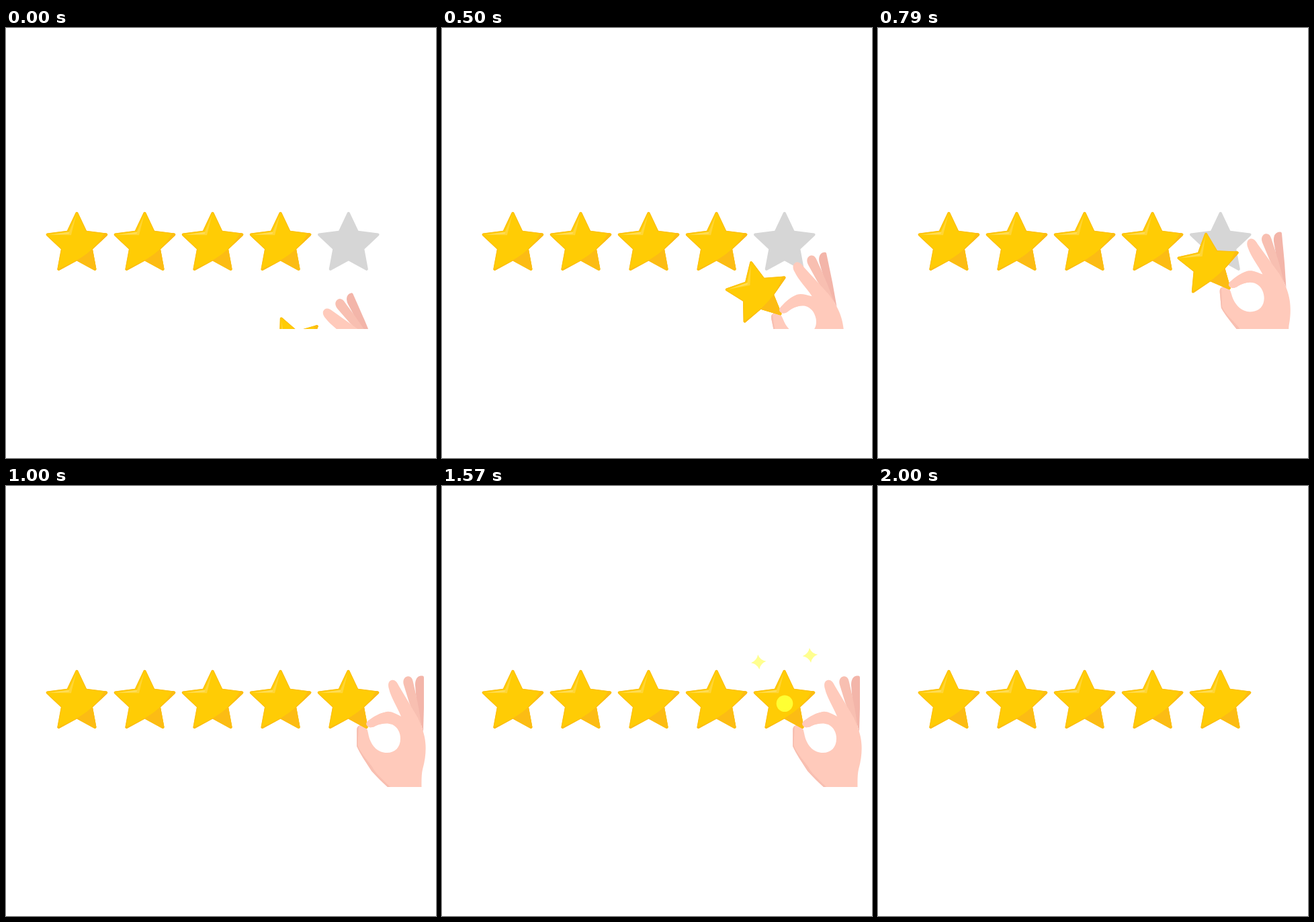
Recreate the animation shown at these times as an HTML page with a canvas. Size 640 by 640 pixels, loop 2210 ms.

```html
<!DOCTYPE html>
<html lang="en">
<head>
<meta charset="utf-8">
<title>Five star rating</title>
<style>
html, body { margin: 0; width: 100%; height: 100%; overflow: hidden; background: #fff; }
canvas { display: block; }
</style>
</head>
<body>
<canvas id="stage" width="640" height="640"></canvas>
<script>
const ctx = document.getElementById('stage').getContext('2d');
const LOOP = 2210, FPS = 14;
const FLOOR = 448;                 // the hand is hidden below this line
const SLOT = { x: 509.5, y: 307 }; // pivot of the last star
const ARRIVE = 14, LEAVE = 22, GONE = 28;
const SKIN = '#ffcabb', SKIN_MID = '#f8bfb1', SKIN_DARK = '#f3b5a9';
const GLOW = '#ffff33';

// Pose of hand and star on the way in: step, x shift, y shift, degrees
const POSES = [
  [0, -87.1, 154.3, -23.8],
  [4, -60, 104.4, -17],
  [7, -43, 73, -11.7],
  [11, -18.5, 31, -5.3],
  [14, 0, 0, 0]
];

function starPath() {
  const R = 50.7, r = 24.8, pts = [];
  for (let i = 0; i < 10; i++) {
    const a = i * Math.PI / 5 - Math.PI / 2, d = i % 2 ? r : R;
    pts.push([d * Math.cos(a), d * Math.sin(a)]);
  }
  const p = new Path2D();
  p.moveTo(...pts[9]);
  for (let i = 0; i < 10; i += 2) {
    p.arcTo(...pts[i], ...pts[i + 1], 2);
    p.lineTo(...pts[i + 1]);
  }
  p.closePath();
  return p;
}

const STAR = starPath();
const SHADE = new Path2D('M41 -17 Q24 18 -30 37.5 L-30 60 L60 60 L60 -17Z');
const FACET = new Path2D('M-1 -43 L-11.5 -18.5 L-42 -14 L-8.5 -13.5Z');
const SHINE = new Path2D('M-1.5 -41 L-11 -17.6 L-39 -14 L-12 -15.5Z');

const PALM = new Path2D(`M537 361 C536 355 529 354 525 357 C522 359 522 362 522 366
  L522 387 C527 399 536 411 544 424 C552 433 560 441 568 448 L576 520 L617 520 L618.5 448
  C618.3 437 618.6 428 620 422 C624 408 625 396 624.5 386 C624 374 621 363 613 345
  L585 298 C582 291 578 288 574.5 288.8 C569 290 568 296 570 302 C573 315 583 330 588 343
  C580 339 573 335 567 336 C556 338 548 343 541 348 C536 351 535 354 537.5 357
  C541 360.5 546 359.5 550 357 C558 353.5 567 352 575 355 C583 359 587 367 587 376
  C587 389 579 397 567 397 C553 397 545 387 541 376 C539 370 539 365 537 361Z`);
const INDEX = new Path2D(`M567 336 C556 338 548 343 541 348 C536 351 535 354 537.5 357
  C541 360.5 546 359.5 550 357 C556 354 562 353 567 353Z`);
const EDGE = new Path2D(`M525 357 C522 359 522 362 522 366 L522 387 C527 399 536 411 544 424
  C552 433 560 441 568 448 L572 448 C560 436 550 428 545 418 C536 406 527 396 523.5 386Z`);
const RING = new Path2D(`M592 296 C590 289 593 284 598 283.3 C603 283 605 287 606 292
  C610 310 615 330 619 362 L610 348 L600 322Z`);
const PINKY = new Path2D(`M609 296 C609 288 612 283.5 617 282.6 L620 282.6
  Q622 282.8 622 285 L622 330 L621 366 L612 335Z`);
const SPARK = new Path2D(`M0 -11 Q2.4 -2.4 11.3 0 Q2.4 2.4 0 11 Q-2.4 2.4 -11.3 0
  Q-2.4 -2.4 0 -11Z`);

function fill(path, color) {
  ctx.fillStyle = color;
  ctx.fill(path);
}

function drawStar(x, gold) {
  ctx.save();
  ctx.translate(x, SLOT.y + 14.7);
  if (gold) {
    ctx.clip(STAR);
    fill(STAR, '#ffcc05');
    fill(SHADE, '#fcbc14');
    ctx.lineWidth = 2.4;
    ctx.strokeStyle = '#fcbf12';
    ctx.stroke(STAR);
    fill(FACET, '#ffd535');
    fill(SHINE, '#ffdf60');
  } else {
    fill(STAR, '#d6d6d6');
  }
  ctx.restore();
}

// Smooth curve through the poses, straight on before the first one
function poseAt(s) {
  if (s < 0) return [-87.1 + 7 * s, 154.3 - 15 * s, -23.8 + 1.7 * s];
  const out = [0, 0, 0];
  for (const p of POSES) {
    let w = 1;
    for (const q of POSES) if (q !== p) w *= (s - q[0]) / (p[0] - q[0]);
    for (let i = 0; i < 3; i++) out[i] += w * p[i + 1];
  }
  return out;
}

function posed(s, draw) {
  const [dx, dy, deg] = poseAt(s);
  ctx.save();
  ctx.beginPath();
  ctx.rect(0, 0, 640, FLOOR);
  ctx.clip();
  ctx.translate(SLOT.x + dx, SLOT.y + dy);
  ctx.rotate(deg * Math.PI / 180);
  ctx.translate(-SLOT.x, -SLOT.y);
  draw();
  ctx.restore();
}

function drawHand() {
  fill(PINKY, SKIN_DARK);
  fill(RING, SKIN_MID);
  fill(PALM, SKIN);
  fill(EDGE, SKIN_MID);
}

function drawSpark(x, y, alpha) {
  ctx.save();
  ctx.globalAlpha = alpha;
  ctx.translate(x, y);
  ctx.rotate(-0.1);
  fill(SPARK, GLOW);
  ctx.restore();
}

function drawGlow(p) {
  if (p <= 0) return;
  ctx.fillStyle = GLOW;
  ctx.beginPath();
  ctx.arc(510, 323.8, 22.4 * p, 0, 2 * Math.PI);
  ctx.fill();
  drawSpark(471.3, 262, p);
  drawSpark(548, 252, p);
}

function render(t) {
  const k = Math.floor((t + 5) * FPS / 1000);
  ctx.fillStyle = '#fff';
  ctx.fillRect(0, 0, 640, 640);
  for (let i = 0; i < 4; i++) drawStar(105.4 + 101.05 * i, true);

  const landed = k >= ARRIVE, hand = k < GONE;
  const s = k <= LEAVE ? Math.min(k, ARRIVE)
                       : ARRIVE - 20 * (k - LEAVE) / (GONE - LEAVE);
  if (!landed) drawStar(SLOT.x + 0.3, false);
  if (hand) posed(s, drawHand);
  if (landed) drawStar(SLOT.x, true);
  else posed(s, () => drawStar(SLOT.x, true));
  if (hand) posed(s, () => fill(INDEX, SKIN));
  drawGlow(1 - 0.225 * Math.max(19 - k, k - 20, 0));
}

const start = performance.now();
function tick() {
  render((performance.now() - start) % LOOP);
  requestAnimationFrame(tick);
}
tick();
</script>
</body>
</html>
```
